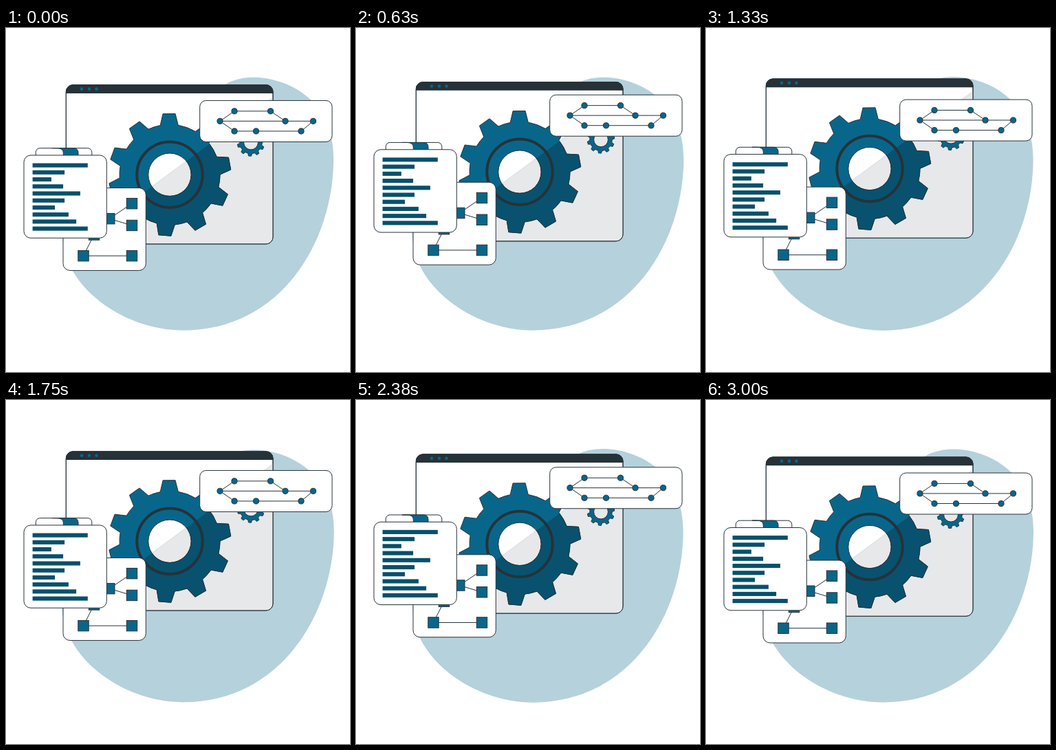
An HTML page for the animation above (3.04 s loop, 500 by 500 pixels).

```html
<!DOCTYPE html>
<html lang="en">
<head>
<meta charset="utf-8">
<title>Floating workflow panels</title>
<style>
  html, body { margin: 0; width: 100%; height: 100%; overflow: hidden; background: #fff; }
  svg { display: block; width: 100vw; height: 100vh; }
  .line { fill: none; stroke: #263238; stroke-width: 1; }
  .card { fill: #fff; stroke: #263238; stroke-width: 1; }
  .blue { fill: #09668b; stroke: #263238; stroke-width: 1; }
</style>
</head>
<body>
<svg viewBox="0 0 500 500">
  <defs>
    <clipPath id="below"><path d="M388 101L99 314H388Z"/></clipPath>
  </defs>

  <path id="blob" fill="#b5d1dc" d="M360 71.5C400 71.5 476 97 476 190C476 310 400 439.5 257 439.5C170 439.5 82 375 82 300C82 200 240 180 300 98C312 82 332 71.5 360 71.5Z"/>

  <g id="window">
    <rect class="card" x="87.3" y="83" width="300.7" height="231.2" rx="10"/>
    <path fill="#e6e8ea" d="M387.5 101.4L99 313.7H378A9.5 9.5 0 0 0 387.5 304Z"/>
    <path class="line" style="stroke:#c9cdd0;stroke-width:.6" d="M387.5 101.4L99 314"/>
    <path fill="#263238" d="M87 95.2V93A10.3 10.3 0 0 1 97.3 82.6H378A10.3 10.3 0 0 1 388.4 93V95.2Z"/>
    <g id="dots" fill="#09668b"></g>
    <rect class="line" x="87.3" y="83" width="300.7" height="231.2" rx="10"/>
    <path id="gear" class="blue" fill-rule="evenodd"/>
    <path id="gearShade" fill="#08526f" fill-rule="evenodd" stroke="#263238" clip-path="url(#below)"/>
    <circle class="line" cx="238" cy="213.5" r="47.7" style="stroke-width:4"/>
    <path id="cog" class="blue" fill-rule="evenodd"/>
  </g>

  <g class="float">
    <rect class="card" x="281.7" y="106" width="192.3" height="60" rx="9"/>
    <path class="line" d="M311 135.9L332 121.4H384.5L406 135.9M311 135.9H446.5L429 150.5H332Z"/>
    <g id="nodes"></g>
  </g>

  <g class="float">
    <rect class="card" x="83" y="233" width="120.3" height="120" rx="10"/>
    <path class="line" d="M128 301L112.5 331.7H183M183 255.7L150.3 277.7L183 287.5"/>
    <g id="boxes"></g>
  </g>

  <g class="float">
    <rect class="card" x="43.3" y="175.2" width="81.5" height="20" rx="6"/>
    <path class="blue" d="M67 175.2H98Q105 175.2 105 182V190H83.3V182Q83.3 175.2 74 175.2Z"/>
    <rect class="card" x="26" y="185.5" width="120.3" height="120.3" rx="10"/>
    <g id="bars" fill="#07506b"></g>
  </g>
</svg>

<script>
  const $ = id => document.getElementById(id);

  function add(parent, tag, attrs) {
    const el = document.createElementNS('http://www.w3.org/2000/svg', tag);
    for (const key in attrs) el.setAttribute(key, attrs[key]);
    $(parent).append(el);
  }

  // Toothed wheel with a round hole; teeth are centre angles in degrees.
  function wheel(cx, cy, outer, root, hole, teeth, tip, base) {
    const at = (r, deg) => {
      const a = deg * Math.PI / 180;
      return (cx + r * Math.cos(a)).toFixed(2) + ' ' + (cy + r * Math.sin(a)).toFixed(2);
    };
    const rim = teeth.map((a, i) =>
      (i ? `A${root} ${root} 0 0 1 ` : 'M') + at(root, a - base) +
      'L' + at(outer, a - tip) + 'L' + at(outer, a + tip) + 'L' + at(root, a + base)).join('');
    return rim + `A${root} ${root} 0 0 1 ${at(root, teeth[0] - base)}Z` +
      `M${cx + hole} ${cy}A${hole} ${hole} 0 1 0 ${cx - hole} ${cy}A${hole} ${hole} 0 1 0 ${cx + hole} ${cy}Z`;
  }

  const teeth = [-90.6, -49, -10.5, 24.5, 59.7, 94.6, 130, 166, 200.3, 234.6];
  const big = wheel(238, 213.5, 89, 73, 31.2, teeth, 5.8, 10.3);
  $('gear').setAttribute('d', big);
  $('gearShade').setAttribute('d', big);
  $('cog').setAttribute('d', wheel(356, 166.7, 19.8, 16.2, 10.4, teeth, 5.8, 10.3));

  for (const x of [110, 121, 131.5]) add('dots', 'circle', { cx: x, cy: 88.9, r: 2.3 });

  [[311, 135.9], [332, 121.4], [384.5, 121.4], [406, 135.9], [446.5, 135.9],
   [429, 150.5], [363.5, 150.5], [332, 150.5]].forEach(([x, y]) =>
    add('nodes', 'circle', { class: 'blue', cx: x, cy: y, r: 4.1 }));

  [[183, 255.7], [183, 287.5], [150.3, 277.7], [128, 301], [112.5, 331.7], [183, 331.7]].forEach(([x, y]) =>
    add('boxes', 'rect', { class: 'blue', x: x - 7.7, y: y - 7.7, width: 15.4, height: 15.4 }));

  [80.2, 46.5, 27.3, 44.5, 69.3, 46.5, 32.5, 52.3, 63.5, 80.2].forEach((w, i) =>
    add('bars', 'rect', { x: 38.6, y: 197.1 + i * 10.22, width: w, height: 6.1 }));

  const LOOP = 3040, STEPS = 73, RISE = 10;
  const floats = document.querySelectorAll('.float');
  const up = p => -RISE * (1 - Math.abs(1 - 2 * p));
  // Linear sway: 0, +1 at a quarter, -1 at three quarters, back to 0.
  const sway = p => p < .25 ? 4 * p : p < .75 ? 2 - 4 * p : 4 * p - 4;
  const lift = (el, y) => el.setAttribute('transform', `translate(0 ${y.toFixed(3)})`);

  function draw(ms) {
    const step = Math.floor((ms % LOOP) * 24 / 1000 + .1);
    const slow = (step + 1) % STEPS / STEPS;
    const fast = slow * 2 % 1;
    lift($('window'), up(slow));
    floats.forEach(el => lift(el, up(fast)));
    $('blob').setAttribute('transform', `rotate(${sway(fast).toFixed(4)} 279 255.5)`);
  }

  const start = performance.now();
  function tick() {
    draw(performance.now() - start);
    requestAnimationFrame(tick);
  }
  tick();
</script>
</body>
</html>
```
